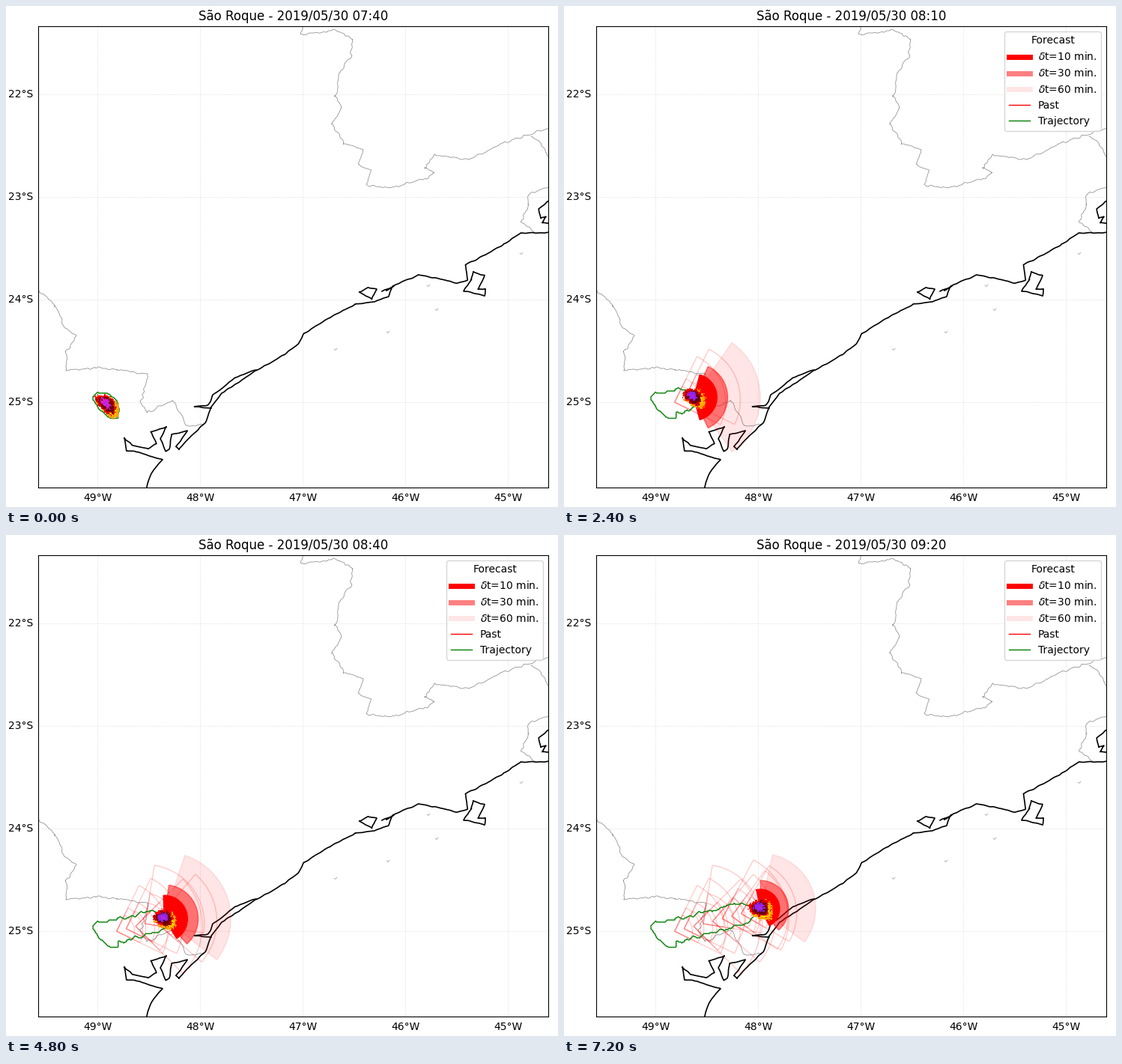
Animation of 737x669 px, one loop 8000 ms. Source, as a matplotlib script:

```python
import numpy as np
import matplotlib.pyplot as plt
from matplotlib.animation import FuncAnimation
from matplotlib.colors import to_rgba
from matplotlib.lines import Line2D
from matplotlib.patches import Wedge

W, H, DPI = 737, 669, 100
LEFT, RIGHT, TOP, BOTTOM = 43.1, 724.1, 27, 643.4
DEGREE = 137  # pixels
KM = 1.4      # radar cell size in pixels
STEPS = 10

# Key points in stage pixels; rough() adds the small detail.
COAST = [
    (725, 302), (706, 303), (687, 303), (665, 318), (642, 331), (613, 346),
    (616, 366), (602, 370), (573, 363), (551, 359), (516, 374), (510, 388),
    (492, 395), (466, 398), (432, 416), (398, 437), (391, 451), (371, 466),
    (334, 487), (288, 517), (274, 536), (266, 557), (247, 574), (231, 592)]
BAY = [
    (231, 592), (227, 588), (242, 568), (221, 572), (218, 592), (213, 594),
    (206, 578), (214, 562), (193, 569), (201, 584), (190, 591), (169, 587),
    (158, 577), (161, 594), (175, 596), (209, 606), (195, 622), (187, 644)]
LAGOON = [(334, 486), (306, 496), (276, 520), (270, 533), (252, 535), (274, 537)]
ISLANDS = [
    [(624, 355), (639, 360), (630, 378), (640, 378), (639, 387), (611, 380),
     (622, 365), (624, 355)],
    [(472, 382), (484, 376), (495, 378), (488, 391), (472, 382)],
    [(502, 381), (518, 374), (508, 380)],
    [(725, 260), (711, 271), (714, 284), (721, 281), (716, 290), (725, 290)],
]
BORDERS = [
    [(396, 27), (395, 38), (437, 32), (463, 43), (461, 66), (446, 88),
     (440, 120), (449, 136), (435, 157), (451, 183), (478, 192), (470, 212),
     (487, 220), (481, 239), (513, 243), (560, 230), (572, 222), (560, 216),
     (572, 199), (618, 205), (667, 182), (725, 163)],
    [(701, 174), (712, 180), (725, 203)],
    [(725, 241), (697, 252), (698, 264), (688, 288), (706, 303)],
    [(43, 378), (66, 400), (80, 432), (94, 441), (80, 462), (80, 487),
     (120, 482), (150, 486), (189, 492), (180, 529), (189, 543), (223, 526),
     (241, 560), (264, 558)],
]
ISLETS = [(575, 405), (564, 373), (510, 435), (440, 458), (688, 330)]

# One forecast per time step after the first.
HEADINGS = (19, 19, 0, 36, 4, 17, 9, 15, 20)
REACHES = (68, 75, 89, 79, 83, 89, 75, 74, 74)
# share of the one-hour reach and fill strength, for 60, 30 and 10 minutes
HORIZONS = ((1, 0.1), (0.51, 0.5), (0.35, 1))


def elapsed(k):
    """Ten-minute units since the first picture; one is skipped at the end."""
    return k + (k == STEPS - 1)


def storm_at(k):
    t = elapsed(k)
    return 135 + 12.7 * t, 532.5 - 3.35 * t


def rough(points, amp, seed, gap=2):
    """Subdivide a polyline and shake its inner points."""
    rng = np.random.default_rng(seed)
    p = np.array(points, float)
    dist = np.r_[0, np.cumsum(np.hypot(*np.diff(p, axis=0).T))]
    t = np.union1d(np.arange(0, dist[-1], gap), dist)
    q = np.c_[np.interp(t, dist, p[:, 0]), np.interp(t, dist, p[:, 1])]
    noise = rng.normal(0, amp, (len(t) + 2, 2))
    shake = (noise[:-2] + 2 * noise[1:-1] + noise[2:]) / 3
    shake[[0, -1]] = 0
    return q + shake


# radar grid around the storm's path
gx = np.arange(100, 310, KM)
gy = np.arange(470, 580, KM)
GX, GY = np.meshgrid(gx, gy)


def storm_distance(k, dx=0, dy=0):
    """Distance from the storm's core, 1 at its lobed edge."""
    cx, cy = storm_at(k)
    x, y = GX - cx - dx, GY - cy - dy
    tilt = np.radians(45 - 4 * k)
    u = (x * np.cos(tilt) + y * np.sin(tilt)) / (16 + 4 * 0.3 ** k)
    v = (y * np.cos(tilt) - x * np.sin(tilt)) / (11.5 + 0.25 * k)
    a = np.arctan2(v, u)
    lobes = 1 + 0.08 * np.sin(3 * a + 2 * k) + 0.05 * np.sin(8 * a + 5 * k)
    return np.hypot(u, v) / lobes


def storm_image(k):
    rng = np.random.default_rng(40 + k)
    core = "#d61fd6" if k == 0 else "#8f22e8"
    layers = [("orange", 0.92, 2), ("#ffc800", 0.5, 5), ("red", 0.82, -1),
              ("darkred", 0.68, -0.5), ("#640014", 0.5, 0),
              (core, 0.42, -2), ("#b428dc", 0.15, -1.5)]
    img = np.zeros(GX.shape + (4,))
    for colour, size, shift in layers:
        d = storm_distance(k, shift, shift)
        img[d + rng.normal(0, 0.07, d.shape) < size] = to_rgba(colour)
    return img


def wedge(x, y, r, heading, half, **style):
    # the y axis points down, so angles change sign
    return Wedge((x, y), r, -heading - half, -heading + half,
                 lw=1, zorder=4, **style)


fig = plt.figure(figsize=(W / DPI, H / DPI), dpi=DPI, facecolor="white")
ax = fig.add_axes([LEFT / W, 1 - BOTTOM / H,
                   (RIGHT - LEFT) / W, (BOTTOM - TOP) / H])
ax.set_xticks([122.4 + DEGREE * i for i in range(5)],
              [f"{49 - i}°W" for i in range(5)])
ax.set_yticks([118.2 + DEGREE * i for i in range(4)],
              [f"{22 + i}°S" for i in range(4)], va="center")
ax.tick_params(length=0, pad=5)
ax.grid(color="gray", lw=0.5, ls=":", alpha=0.4)
ax.set_axisbelow(True)

for i, line in enumerate(BORDERS):
    ax.plot(*rough(line, 0.9, i).T, color="gray", lw=0.5, zorder=2)
for x, y in ISLETS:
    ax.plot([x - 2, x, x + 2], [y, y + 1.5, y - 1], color="gray", lw=0.4)
for i, line in enumerate([COAST, BAY, LAGOON] + ISLANDS):
    ax.plot(*rough(line, 0.4, 60 + i, 3).T, color="black", lw=1.2, zorder=3)

title = ax.set_title("")
keys = [Line2D([], [], color="red", lw=5, alpha=a, label=rf"$\delta$t={m} min.")
        for m, a in ((10, 1), (30, 0.5), (60, 0.1))]
keys += [Line2D([], [], color="red", lw=1, label="Past"),
         Line2D([], [], color="green", lw=1, label="Trajectory")]
legend = ax.legend(handles=keys, title="Forecast", loc="upper right")
legend.set_zorder(9)
moving = []


def draw_forecast(k, past):
    x, y = storm_at(k)
    heading, reach = HEADINGS[k - 1], REACHES[k - 1]
    for share, alpha in HORIZONS:
        r = reach * share
        if past:
            fan = wedge(x, y, r, heading, 45, fill=False, ec="red", alpha=0.2)
        else:
            # the storm's own width opens the fan beyond 45 degrees
            half = 45 + np.degrees(np.arcsin(15.5 / r))
            fan = wedge(x, y, r, heading, half, color="red", alpha=alpha)
        moving.append(ax.add_patch(fan))


def draw_trail(k):
    """Outline of all the ground covered before this step."""
    d = np.min([storm_distance(i) for i in range(max(1, k))], axis=0)
    moving.append(ax.contour(gx, gy, (d < 1.05).astype(float), [0.5],
                             colors="green", linewidths=1, zorder=5))


def update(k):
    while moving:
        moving.pop().remove()
    minutes = 460 + 10 * elapsed(k)
    title.set_text(f"São Roque - 2019/05/30 {minutes // 60:02d}:{minutes % 60:02d}")
    legend.set_visible(k > 0)
    for i in range(1, k + 1):
        draw_forecast(i, past=i < k)
    draw_trail(k)
    moving.append(ax.imshow(
        storm_image(k), interpolation="nearest", aspect="auto", zorder=6,
        extent=(gx[0] - KM / 2, gx[-1] + KM / 2, gy[-1] + KM / 2, gy[0] - KM / 2)))
    ax.set(xlim=(LEFT, RIGHT), ylim=(BOTTOM, TOP))
    return []


anim = FuncAnimation(fig, update, frames=STEPS, interval=800,
                     init_func=lambda: update(0), repeat=True, repeat_delay=0)
plt.show()
```
